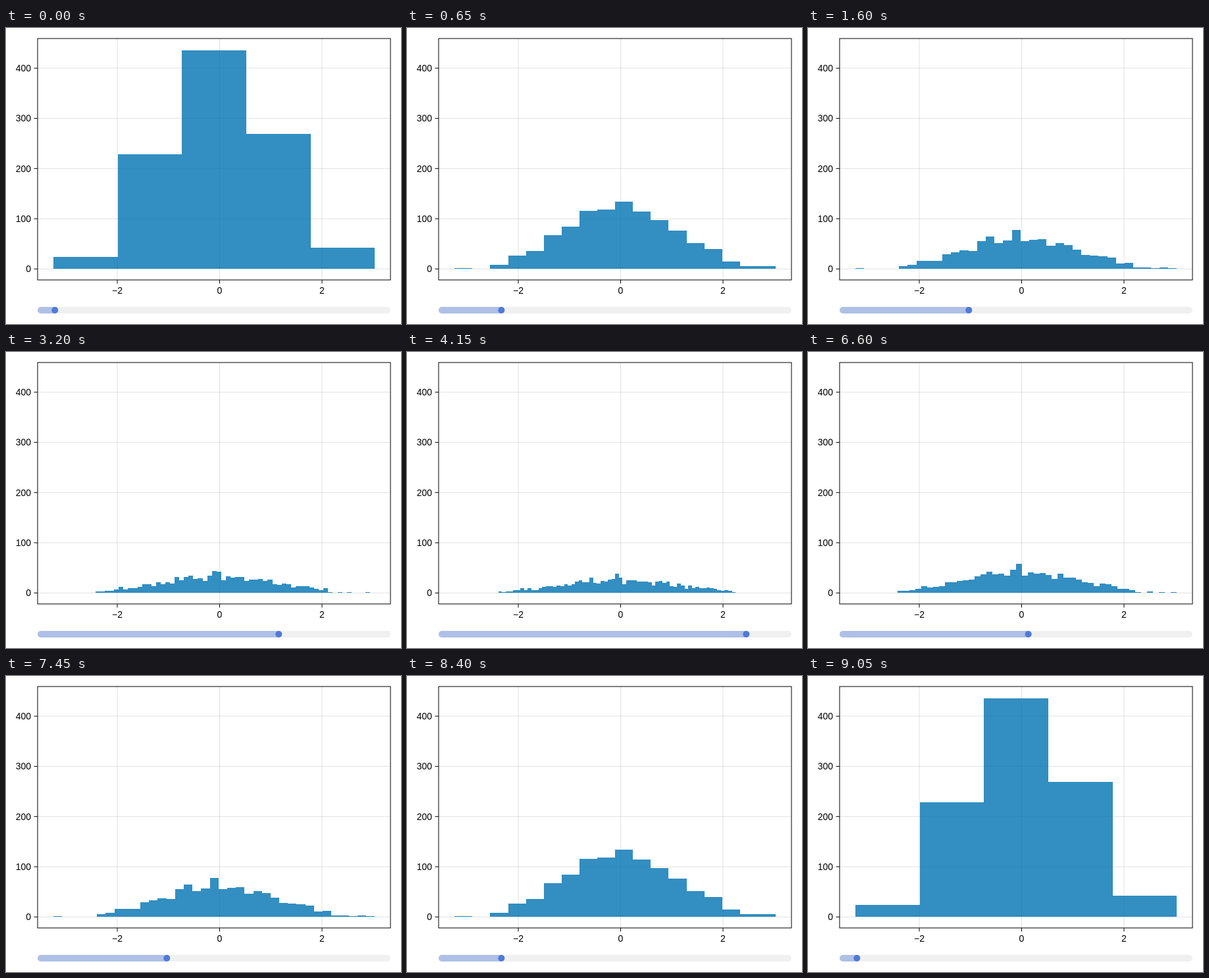
An HTML page that plays this animation: 600x450 px, repeating every 9.1 s.

```html
<!DOCTYPE html>
<html lang="en">
<head>
<meta charset="utf-8">
<title>Histogram with bin slider</title>
<style>
  html, body { margin: 0; width: 100%; height: 100%; overflow: hidden; background: #fff; }
  svg { display: block; width: 600px; height: 450px; }
  text { font: 14px "Liberation Sans", Arial, sans-serif; fill: #000; }
  .grid { stroke: rgba(0, 0, 0, .12); }
  .axis { stroke: #000; fill: none; }
  .track { stroke-width: 10; stroke-linecap: round; }
</style>
</head>
<body>
<svg viewBox="0 0 600 450">
  <g id="grid" class="grid"></g>
  <path id="bars" fill="#0072b2" fill-opacity=".8"/>
  <g id="ticks" class="axis"></g>
  <rect class="axis" x="48" y="16" width="536" height="367"/>
  <g id="labels"></g>
  <path class="track" stroke="#f0f0f0" d="M53 429H579"/>
  <path id="active" class="track" stroke="#aec0e6"/>
  <circle id="knob" cy="429" r="5" fill="#4f7ad6"/>
</svg>
<script>
const $ = id => document.getElementById(id);
const STEP = 50, STEPS = 182, MIN_BINS = 5;
const SAMPLES = 1000, MIN = -3.244, MAX = 3.03, JITTER = 0.03;
const toX = value => 324.5 + 77.75 * value;
const toY = count => 366.3 - 0.763 * count;

// Key points of the cumulative distribution: [value, samples below it].
const cumulative = [
  [MIN, 0], [-3.07, 2], [-2.4, 3], [-2.06, 17], [-1.55, 67], [-1.21, 127],
  [-0.87, 203], [-0.53, 319], [-0.19, 424], [-0.02, 506], [0.49, 677],
  [1, 825], [1.33, 891], [1.84, 965], [2.18, 988], [MAX, SAMPLES]];

function quantile(rank) {
  const k = cumulative.findIndex(([, below]) => below > rank);
  const [v0, r0] = cumulative[k - 1], [v1, r1] = cumulative[k];
  return v0 + (v1 - v0) * (rank - r0) / (r1 - r0);
}

let seed = 7;
function random() {
  seed = (seed * 16807) % 2147483647;
  return seed / 2147483647;
}

const samples = Array.from({ length: SAMPLES },
  (_, i) => quantile(i + .5) + JITTER * (2 * random() - 1));

function countBins(n) {
  const counts = new Array(n).fill(0);
  for (const value of samples) {
    const bin = Math.floor(n * (value - MIN) / (MAX - MIN));
    counts[Math.max(0, Math.min(n - 1, bin))]++;
  }
  return counts;
}

// Bars snap to whole pixels, so a single count stays invisible.
function barsPath(n) {
  const edge = i => Math.round(toX(MIN + (MAX - MIN) * i / n));
  const floor = Math.round(toY(0));
  const steps = countBins(n).map((c, i) => `V${Math.round(toY(c))}H${edge(i + 1)}`);
  return `M${edge(0)} ${floor}${steps.join("")}V${floor}Z`;
}

const line = d => `<path d="${d}"/>`;
function addTick(gridLine, tick, label) {
  $("grid").innerHTML += line(gridLine);
  $("ticks").innerHTML += line(tick);
  $("labels").innerHTML += label;
}
for (let v = -2; v <= 2; v += 2) {
  const x = toX(v), label = String(v).replace("-", "−");
  addTick(`M${x} 16V383`, `M${x} 383v5.5`,
    `<text x="${x}" y="404" text-anchor="middle">${label}</text>`);
}
for (let c = 0; c <= 400; c += 100) {
  const y = toY(c);
  addTick(`M48 ${y}H584`, `M48 ${y}h-5.5`,
    `<text x="38" y="${y + 5}" text-anchor="end">${c}</text>`);
}

let shown = 0;
function draw() {
  const step = Math.floor(performance.now() / STEP) % STEPS;
  const bins = MIN_BINS + Math.min(step, STEPS - 1 - step);
  if (bins !== shown) {
    shown = bins;
    const x = 53 + 526 * (bins - 1) / 99;
    $("bars").setAttribute("d", barsPath(bins));
    $("active").setAttribute("d", `M53 429H${x}`);
    $("knob").setAttribute("cx", x);
  }
  requestAnimationFrame(draw);
}
draw();
</script>
</body>
</html>
```
